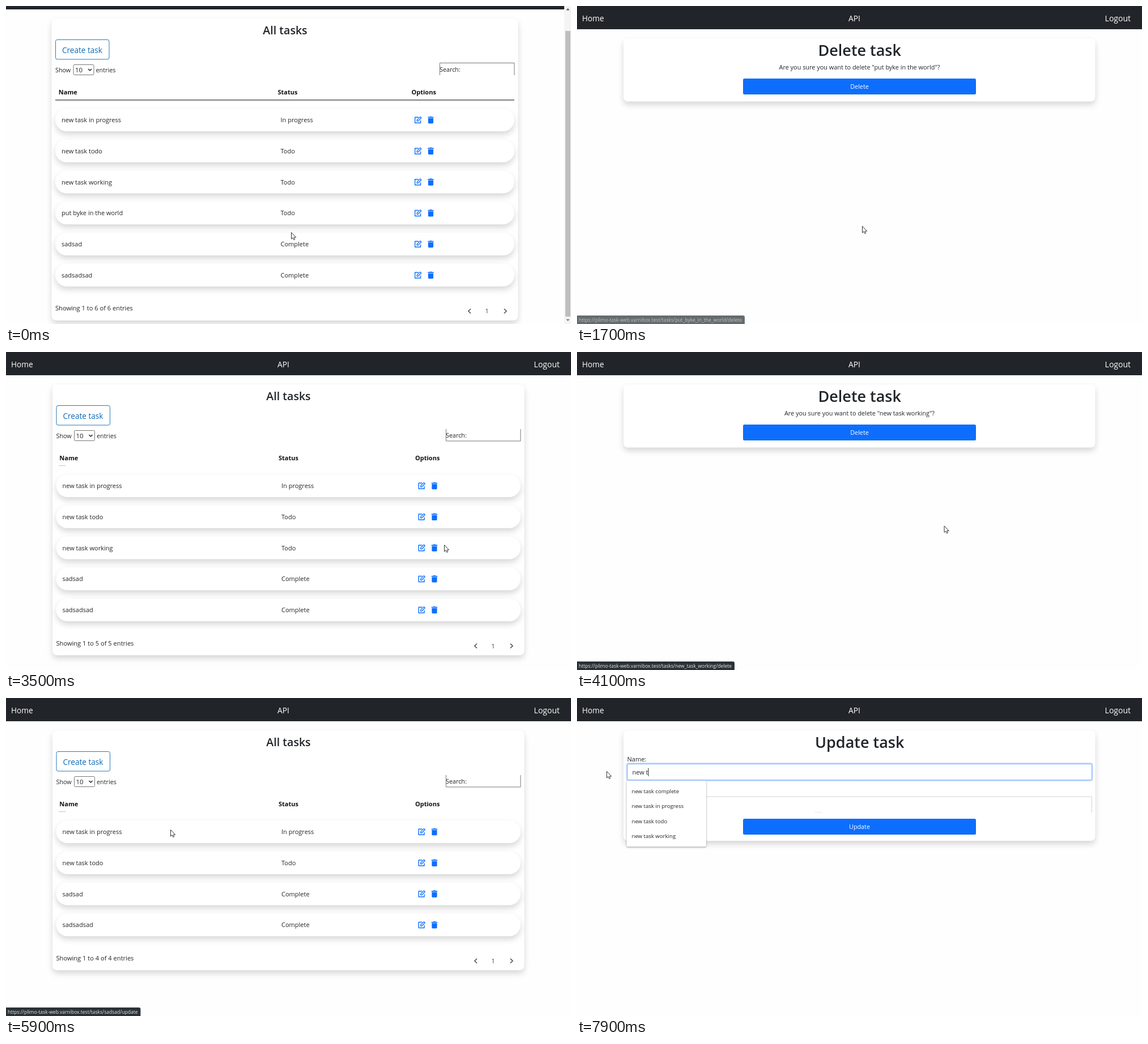
Recreate the animation shown at these times as an HTML page with a canvas. Size 997 px wide and 561 px high, loop 8000 ms.

```html
<!DOCTYPE html>
<html lang="en">
<head>
<meta charset="utf-8">
<title>Task list</title>
<style>
  html, body { margin: 0; width: 100%; height: 100%; overflow: hidden; background: #fefefe; }
  canvas { display: block; }
</style>
</head>
<body>
<canvas id="stage" width="997" height="561"></canvas>
<script>
const ctx = document.getElementById('stage').getContext('2d');
const WIDTH = 997, HEIGHT = 561, LOOP = 8000, STEP = 100;
const INK = '#212529', BLUE = '#0d6efd', DARK_BLUE = '#0b5ed7', LINK = '#0a6ab8';
const HOST = 'https://plimo-task-web.varnibox.test/tasks/';

const FULL = { w: 997, left: 82, right: 914.5, options: 722, scroll: 0 };
const SCROLLED = { w: 985, left: 80.5, right: 903.5, options: 715.5, scroll: 35 };

const TASKS = [
  ['new task in progress', 'In progress'],
  ['new task todo', 'Todo'],
  ['new task working', 'Todo'],
  ['put byke in the world', 'Todo'],
  ['sadsad', 'Complete'],
  ['sadsadsad', 'Complete']
];
const without = (...names) => TASKS.filter(([name]) => !names.includes(name));
const BYKE = 'put byke in the world', WORKING = 'new task working';

// start time and painter of each page
const SCENES = [
  [0, () => listPage(SCROLLED, TASKS)],
  [1400, (t, m) => deletePage(BYKE, t >= 2400, m)],
  [2700, () => listPage(FULL, without(BYKE))],
  [4100, (t, m) => deletePage(WORKING, t >= 4700, m)],
  [5000, () => listPage(FULL, without(BYKE, WORKING))],
  [6000, (t, m) => updatePage(t, m)]
];

// address, shown from, fade start, gone
const LINKS = [
  ['put_byke_in_the_world/delete', 1000, 1660, 1800],
  ['new_task_working/delete', 3700, 4160, 4300],
  ['sadsad/update', 5500, 6060, 6200]
];

// time, x, y of the pointer tip
const PATH = [
  [0, 503, 399], [900, 739, 373], [1000, 749, 365], [1200, 749, 365],
  [1700, 503, 388], [1800, 503, 386], [2300, 509, 149], [2600, 509, 149],
  [3400, 774, 341], [3500, 773, 340], [3700, 756, 346], [3850, 756, 346],
  [4300, 570, 278], [4600, 548, 147], [4800, 548, 147], [4900, 563, 158],
  [5500, 734, 346], [5600, 734, 346], [5900, 290, 232], [6500, 150, 128],
  [6600, 150, 128], [7000, 52, 129], [LOOP, 52, 129]
];

const TYPED = [[7900, 'new t'], [7800, 'new'], [7700, 'ne'], [7600, 'n'], [7400, ''], [0, 'sadsad']];
const HINTS = ['new task complete', 'new task in progress', 'new task todo', 'new task working', 'new list'];

function text(str, x, y, size = 11, { color = INK, weight = 400, align = 'left' } = {}) {
  ctx.font = `${weight} ${size}px "Open Sans", "Noto Sans", sans-serif`;
  ctx.fillStyle = color;
  ctx.textAlign = align;
  ctx.fillText(str, x, y);
}

function box(x, y, w, h, r, fill, stroke, line = 1) {
  ctx.beginPath();
  ctx.roundRect(x, y, w, h, r);
  if (fill) { ctx.fillStyle = fill; ctx.fill(); }
  if (stroke) { ctx.strokeStyle = stroke; ctx.lineWidth = line; ctx.stroke(); }
}

function line(points, color, width = 1) {
  ctx.beginPath();
  points.forEach(([x, y]) => ctx.lineTo(x, y));
  ctx.strokeStyle = color;
  ctx.lineWidth = width;
  ctx.stroke();
}

function shadowBox(x, y, w, h, r, alpha = 0.16, drop = 5.5, blur = 11) {
  ctx.save();
  ctx.shadowColor = `rgba(0,0,0,${alpha})`;
  ctx.shadowOffsetY = drop;
  ctx.shadowBlur = blur;
  box(x, y, w, h, r, '#fff');
  ctx.restore();
}

function navBar(w) {
  ctx.fillStyle = INK;
  ctx.fillRect(0, 0, w, 41);
  const white = { color: '#fff' };
  text('Home', 9, 27, 13.6, white);
  text('API', w / 2 - 9, 27, 13.8, { color: '#fff', align: 'center' });
  text('Logout', w - 20, 27, 14, { color: '#fff', align: 'right' });
}

function card(page, bottom) {
  shadowBox(page.left, 57.5, page.right - page.left, bottom - 57.5, 8);
}

function editIcon(x, y) {
  ctx.lineJoin = 'round';
  line([[x + 1, y - 4.8], [x - 5.3, y - 4.8], [x - 5.3, y + 5.3], [x + 4.6, y + 5.3], [x + 4.6, y + 0.8]], BLUE, 1.4);
  line([[x - 2, y + 2.4], [x - 1.6, y - 0.2], [x + 4, y - 5.6], [x + 5.8, y - 3.8], [x + 0.4, y + 1.8], [x - 2, y + 2.4]], BLUE, 1.3);
  ctx.lineJoin = 'miter';
}

function trashIcon(x, y) {
  ctx.fillStyle = BLUE;
  ctx.fillRect(x - 5.2, y - 5.4, 10.4, 1.7);
  ctx.fillRect(x - 1.8, y - 6.3, 3.6, 1);
  box(x - 4.6, y - 3, 9.2, 9.2, [0, 0, 1.4, 1.4], BLUE);
}

function scrollBar() {
  ctx.fillStyle = '#f4f4f4';
  ctx.fillRect(985, 0, 12, HEIGHT);
  ctx.fillStyle = '#bebebe';
  ctx.fillRect(987, 44, 9, 504);
  for (const [y, dir, color] of [[6, -1, '#555'], [554, 1, '#777']]) {
    ctx.beginPath();
    ctx.moveTo(988.5, y - dir * 1.5);
    ctx.lineTo(994.5, y - dir * 1.5);
    ctx.lineTo(991.5, y + dir * 2);
    ctx.fillStyle = color;
    ctx.fill();
  }
}

function listPage(page, tasks) {
  const { w, left: l, right: r, options, scroll } = page;
  const last = 236 + (tasks.length - 1) * 54.75;
  ctx.save();
  ctx.translate(0, -scroll);
  navBar(w);
  card(page, last + 80);

  text('All tasks', w / 2, 84.5, 19.6, { weight: 600, align: 'center' });
  box(l + 7, 94.5, 94.5, 34.5, 3, '#fff', '#2679b8');
  text('Create task', l + 54, 118, 13.6, { color: LINK, align: 'center' });

  text('Show', l + 6.5, 151.5, 10.8);
  box(l + 38.5, 138.5, 36, 18, 2, '#fff', '#777');
  text('10', l + 41.5, 152, 11.5);
  line([[l + 64.5, 146], [l + 67.5, 149], [l + 70.5, 146]], '#222', 1.5);
  text('entries', l + 78, 151.5, 10.8);

  text('Search:', r - 138.5, 150.5, 10.8);
  const fieldL = r - 138, fieldR = r - 6.5;
  line(scroll
    ? [[fieldL, 157], [fieldL, 135.5], [fieldR, 135.5], [fieldR, 157]]
    : [[fieldL, 136], [fieldL, 157], [fieldR, 157], [fieldR, 136]], '#777');

  const bold = { weight: 700, color: '#111' };
  text('Name', l + 12.3, 190.5, 11, bold);
  text('Status', l + 399, 190.5, 11, bold);
  text('Options', options, 190.5, 11, bold);
  if (scroll) line([[l + 6.5, 200.8], [r - 6.5, 200.8]], '#333', 1.2);
  else line([[93, 200.5], [105, 200.5]], '#c4c4c4');

  tasks.forEach(([name, status], i) => {
    const y = 236 + i * 54.75;
    shadowBox(l + 6.5, y - 20, r - l - 13, 40, 20);
    text(name, l + 17.5, y + 4.2);
    text(status, l + 404, y + 4.2);
    editIcon(options + 11.5, y);
    trashIcon(options + 34, y);
  });

  const n = tasks.length;
  text(`Showing 1 to ${n} of ${n} entries`, l + 6.5, last + 62.5, 11.1);
  const py = last + 63.5;
  line([[r - 83.5, py - 4], [r - 87.5, py], [r - 83.5, py + 4]], '#555', 1.7);
  line([[r - 24.5, py - 4], [r - 20.5, py], [r - 24.5, py + 4]], '#555', 1.7);
  text('1', r - 54.8, py + 4, 11, { align: 'center', color: '#444' });
  ctx.restore();
  if (scroll) scrollBar();
}

const inside = ([x, y], x0, y0, x1, y1) => x >= x0 && x <= x1 && y >= y0 && y <= y1;

function wideButton(label, y, mouse, focused) {
  if (focused) box(290.5, y - 2.5, 416, 33, 4, '#9ec5fe');
  const active = focused || inside(mouse, 293, y, 704, y + 28);
  box(293, y, 411, 28, 2.5, active ? DARK_BLUE : BLUE);
  text(label, 498.5, y + 18.3, 10.8, { color: '#fff', align: 'center' });
}

function formPage(title, bottom) {
  navBar(WIDTH);
  card(FULL, bottom);
  text(title, 498.7, 87.5, 27, { weight: 600, align: 'center' });
}

function deletePage(name, focused, mouse) {
  formPage('Delete task', 168.5);
  text(`Are you sure you want to delete "${name}"?`, 498.5, 112.3, 10.9, { align: 'center' });
  wideButton('Delete', 128, mouse, focused);
}

function updatePage(t, mouse) {
  const focused = t >= 6600;
  const value = TYPED.find(([from]) => t >= from)[1];
  formPage('Update task', 252);
  text('Name:', 88.5, 112.3);

  if (focused) box(86.5, 114, 824, 33, 4.5, '#c2dbfe');
  box(89, 116.5, 819.5, 28, 3, '#fff', focused ? '#86b7fe' : '#ced4da');
  const start = 97.5;
  text(value, start, 135);
  const end = start + ctx.measureText(value).width;
  if (t >= 6700 && t < 7400) {
    const from = Math.max(start, Math.min(end, mouse[0]));
    ctx.fillStyle = '#1a73e8';
    ctx.fillRect(from, 123, end - from, 15);
    ctx.save();
    ctx.beginPath();
    ctx.rect(from, 120, end - from, 22);
    ctx.clip();
    text(value, start, 135, 11, { color: '#fff' });
    ctx.restore();
  } else if (focused) {
    line([[end + 0.5, 123.5], [end + 0.5, 138]], '#222');
  }

  text('Status:', 88.5, 169);
  line([[89, 202], [89, 174], [908.5, 174], [908.5, 202]], '#ced4da');
  line([[420, 201.5], [432, 201.5]], '#e4e6e8');
  text('Complete', start, 192.3);
  wideButton('Update', 213, mouse, false);

  if (t >= 7600) {
    const hints = value.length > 3 ? HINTS.slice(0, 4) : HINTS;
    shadowBox(87.5, 146, 140.5, 11 + hints.length * 26.3, 2, 0.4, 1, 3);
    hints.forEach((hint, i) => text(hint, 96.5, 168 + i * 26.3, 9.6));
  }
}

function statusBar(t) {
  for (const [path, from, fade, gone] of LINKS) {
    if (t < from || t >= gone) continue;
    ctx.save();
    ctx.globalAlpha = Math.min(1, (gone - t) / (gone - fade));
    ctx.font = '8.5px "Open Sans", "Noto Sans", sans-serif';
    const w = ctx.measureText(HOST + path).width;
    box(0, 546, w + 8, 15, [0, 3, 0, 0], '#2b3236');
    text(HOST + path, 3, 556.5, 8.5, { color: '#e8eaed' });
    ctx.restore();
  }
}

function pointerAt(t) {
  const i = PATH.findIndex(([time]) => time > t);
  const [t0, x0, y0] = PATH[i - 1], [t1, x1, y1] = PATH[i];
  const p = (t - t0) / (t1 - t0), k = p * p * (3 - 2 * p);
  return [x0 + (x1 - x0) * k, y0 + (y1 - y0) * k];
}

const ARROW = new Path2D('M0 0V11.5L2.6 9.2L4.4 13L6.3 12.2L4.6 8.6H8.2Z');
const HAND = new Path2D('M-1 1Q0-1 1 1V6L5 7Q6.5 7.5 6.3 9.5L5.3 15H-.5L-3.6 10Q-4 8-1 9.3Z');

function drawPointer([x, y], shape) {
  ctx.save();
  ctx.translate(x + 0.5, y + 0.5);
  if (shape === 'beam') {
    line([[-2, -6], [2, -6]], '#333');
    line([[0, -6], [0, 6]], '#333');
    line([[-2, 6], [2, 6]], '#333');
  } else {
    const path = shape === 'hand' ? HAND : ARROW;
    ctx.fillStyle = '#fff';
    ctx.strokeStyle = '#333';
    ctx.lineWidth = 1;
    ctx.fill(path);
    ctx.stroke(path);
  }
  ctx.restore();
}

function pointerShape(t, mouse) {
  const onForm = (t >= 1400 && t < 2700) || (t >= 4100 && t < 5000);
  if (onForm && inside(mouse, 293, 128, 704, 156)) return 'hand';
  if (t >= 6000 && inside(mouse, 89, 116, 908, 145)) return 'beam';
  const onLink = (t >= 1000 && t <= 1200) || (t >= 3700 && t <= 3850) || (t >= 5500 && t <= 5600);
  return onLink ? 'hand' : 'arrow';
}

function draw(t) {
  const mouse = pointerAt(t);
  ctx.fillStyle = '#fefefe';
  ctx.fillRect(0, 0, WIDTH, HEIGHT);
  SCENES.filter(([from]) => t >= from).pop()[1](t, mouse);
  statusBar(t);
  drawPointer(mouse, pointerShape(t, mouse));
}

const origin = performance.now();
function tick() {
  const elapsed = Math.max(0, performance.now() - origin) % LOOP;
  draw(Math.floor(elapsed / STEP) * STEP);
  requestAnimationFrame(tick);
}
tick();
</script>
</body>
</html>
```
